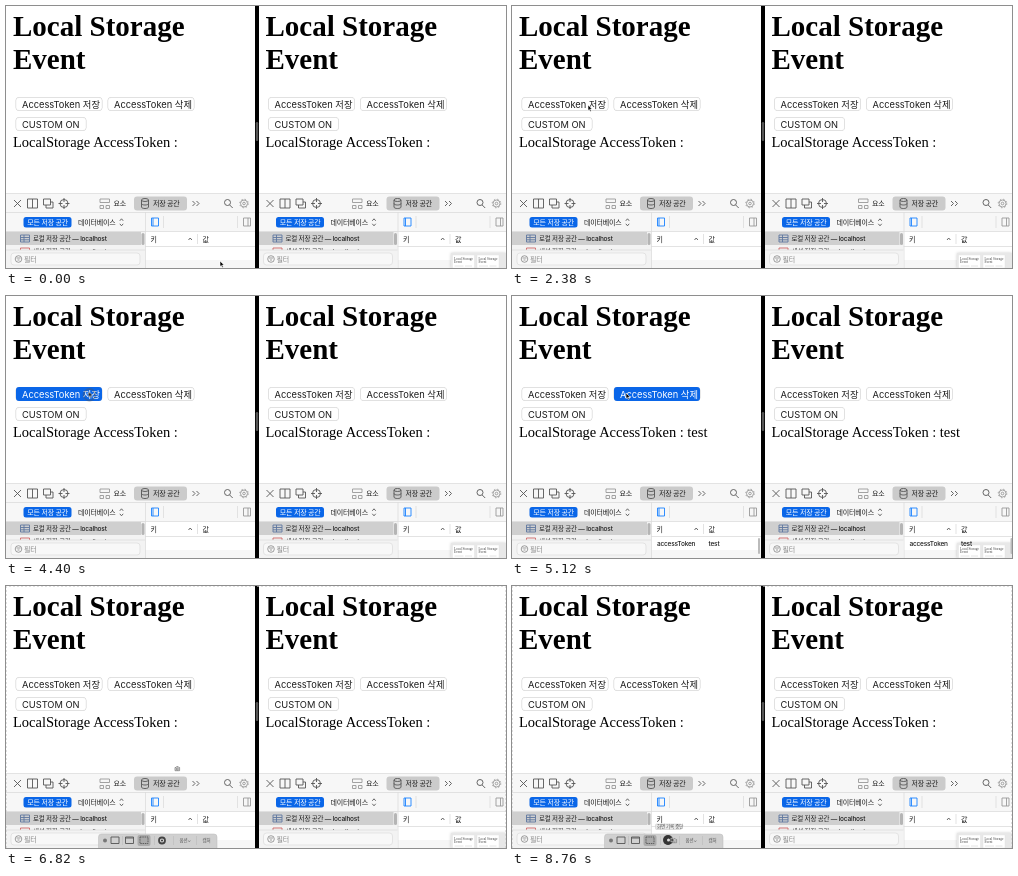
An HTML page that plays this animation: 500x262 px, repeating every 8.78 s.

```html
<!DOCTYPE html>
<html lang="ko">
<head>
<meta charset="utf-8">
<title>Local Storage Event</title>
<style>
html, body { margin: 0; width: 100%; height: 100%; overflow: hidden; background: #fff; }
svg { display: block; width: 500px; height: 262px; }
text { font-family: Inter, "Noto Sans CJK KR", "Noto Sans CJK", sans-serif; font-size: 7px; font-weight: 500; letter-spacing: -.03em; fill: #1c1c1c; }
.page { font: 14.5px "Liberation Serif", Times, serif; letter-spacing: 0; fill: #000; }
.h1 { font-size: 29px; font-weight: 700; }
.btn { font-size: 9.3px; font-weight: 400; letter-spacing: 0; }
.small { font-size: 6.5px; }
.tiny { font-size: 3.4px; fill: #444; }
.mini { font-size: 4.5px; fill: #555; }
.white { fill: #fff; }
.line { fill: none; stroke: #555; stroke-width: .9; }
.pale { stroke: #999; }
.rule { fill: none; stroke: #dcdcdc; stroke-width: .8; }
.box { fill: #fff; stroke: #e2e2e2; stroke-width: .5; filter: drop-shadow(0 .6px .7px #0005); }
.blue { fill: #0a66e8; }

.anim { animation: 8.78s step-end infinite; }
.hidden { opacity: 0; }
.custom { animation-name: custom; }
.save { animation-name: save; }
.del { animation-name: del; }
.stored { animation-name: stored; }
.ring { animation-name: ring; }
.arrow { animation-name: before; }
.camera, .capture { animation-name: after; }
.record { animation-name: record; }
.cursor { animation: move 8.78s ease-in-out infinite; }

@keyframes custom { 0%, 20.5% { opacity: 0 } 18.9% { opacity: 1 } }
@keyframes save { 0%, 31.66%, 51.02% { opacity: 0 } 30.29%, 49.65% { opacity: 1 } }
@keyframes del { 0%, 39.86%, 58.77% { opacity: 0 } 38.72%, 57.17% { opacity: 1 } }
@keyframes stored { 0%, 39.86%, 58.77% { opacity: 0 } 31.66%, 51.02% { opacity: 1 } }
@keyframes ring {
  0%, 20.3%, 31.5%, 39.8%, 50.9%, 58.1% { opacity: 0 }
  18.67%, 30.29%, 38.6%, 49.65%, 56.94% { opacity: 1 }
}
@keyframes before { 0% { opacity: 1 } 76.1% { opacity: 0 } }
@keyframes after { 0% { opacity: 0 } 76.1% { opacity: 1 } }
@keyframes record { 0% { opacity: 0 } 96.1% { opacity: 1 } }
@keyframes move {
  0%, .2% { transform: translate(214px, 255px) }
  2.28%, 4.78% { transform: translate(127px, 252px) }
  10.7%, 13.2% { transform: translate(64px, 117px) }
  14.1%, 23.9% { transform: translate(64px, 116px) }
  27.1%, 33.7% { transform: translate(76px, 99px) }
  36.2%, 40.5% { transform: translate(116px, 97px) }
  47.6%, 51% { transform: translate(82.5px, 95.5px) }
  53.5% { transform: translate(115px, 97px) }
  54.4%, 61.3% { transform: translate(114px, 97px) }
  68.8%, 77.9% { transform: translate(169px, 181px) }
  85.9% { transform: translate(198px, 250px) }
  95.9%, 100% { transform: translate(160px, 253px) }
}
</style>
</head>
<body>
<svg viewBox="0 0 500 262">
  <defs>
    <g id="pane">
      <text class="page h1" x="7" y="29.800">Local Storage</text>
      <text class="page h1" x="7" y="62.800">Event</text>
      <text class="page" x="7" y="141">LocalStorage AccessToken :</text>
      <rect class="box" x="10" y="91.500" width="86" height="13" rx="3"/>
      <rect class="box" x="102" y="91.500" width="86" height="13" rx="3"/>
      <rect class="box" x="10" y="111.500" width="70" height="13" rx="3"/>
      <text class="btn" x="16" y="101.500">AccessToken 저장</text>
      <text class="btn" x="108" y="101.500">AccessToken 삭제</text>
      <text class="btn" x="16" y="121.500">CUSTOM ON</text>

      <path fill="#f7f7f7" d="M0 188h249v37H0z"/>
      <path fill="#f3f3f3" d="M0 225h139v37H0z"/>
      <path fill="#f6f6f6" d="M139 254h110v8H139z"/>
      <path class="rule" d="M0 187.500h249M0 206.500h249M0 225.500h249M139.500 206v56M139 240.500h110M157.500 210v12M231.500 210v12M191.500 228v10"/>

      <rect x="128" y="190.500" width="53" height="14" rx="3" fill="#cbcbcb"/>
      <g class="line">
        <path d="M8 194l7 7m0-7l-7 7M21.500 193h10v9h-10zM26.500 193v9M37.500 193h7v6h-7zM40 199v3h7v-6h-2.500"/>
        <circle cx="58" cy="197.500" r="4"/>
        <path d="M58 192v4m0 3v4M52.500 197.500h4m3 0h4"/>
        <path class="pale" d="M94 193h9.500v3.500H94zM94 199.500h3.500v3H94zM100 199.500h3.500v3H100z"/>
        <ellipse cx="139" cy="194" rx="3.500" ry="1.500"/>
        <path d="M135.500 194v7c0 2 7 2 7 0v-7m-7 3.500c0 2 7 2 7 0"/>
        <path d="M186.500 195l2.500 2.500-2.500 2.500m4-5l2.500 2.500-2.500 2.500"/>
        <circle cx="221.500" cy="196.500" r="3"/>
        <path d="M223.700 199l3 3"/>
        <g class="pale">
          <circle cx="238" cy="197.500" r="3.500"/>
          <circle cx="238" cy="197.500" r="1.300"/>
          <circle cx="238" cy="197.500" r="4.300" stroke-dasharray="1.400 2"/>
          <path d="M237.500 212h7v8h-7zM242 212v8"/>
        </g>
        <path d="M113.800 214.800l1.700-2 1.700 2m-3.400 3l1.700 2 1.700-2M182.500 234l1.700-2 1.700 2"/>
      </g>
      <text x="107.500" y="200">요소</text>
      <text x="147" y="200">저장 공간</text>

      <rect class="blue" x="17.500" y="211" width="48" height="10.500" rx="2.500"/>
      <text class="white" x="21.300" y="218.700">모든 저장 공간</text>
      <text x="72" y="218.700">데이터베이스</text>
      <path class="line" d="M145.500 212h7v8h-7zM147 212v8" style="stroke:#1a82ff"/>

      <path fill="#cfcfcf" d="M0 226h135v13H0z"/>
      <rect x="135.500" y="227" width="3" height="12" rx="1.500" fill="#b5b5b5"/>
      <path class="line" d="M14.500 229h9v7h-9zM14.500 231.500h9m-9 2.300h9M18 229v7" style="stroke:#5f78a0"/>
      <text class="small" x="27" y="235">로컬 저장 공간 — localhost</text>
      <path class="line" d="M14.500 242h9v4h-9z" style="stroke:#c66"/>
      <text class="small" x="27" y="247.500">세션 저장 공간 — localhost</text>
      <path fill="#f3f3f3" d="M0 244h139v18H0z"/>
      <path class="rule" d="M0 244h139"/>
      <rect x="5" y="247" width="129" height="12" rx="3" fill="#f8f8f8" stroke="#dcdcdc" stroke-width=".7"/>
      <g class="line" style="stroke:#777;stroke-width:.7">
        <circle cx="12.500" cy="253" r="3.300"/>
        <path d="M10.500 252h4m-3 2h2"/>
      </g>
      <text x="18" y="255.700" style="fill:#888">필터</text>
      <text x="144.500" y="235.500">키</text>
      <text x="196.500" y="235.500">값</text>
    </g>

    <g id="data">
      <text class="page" x="175.300" y="141">test</text>
      <text class="small" x="145" y="249.500">accessToken</text>
      <text class="small" x="196.500" y="249.500">test</text>
      <rect x="246" y="242" width="2" height="16" rx="1" fill="#bbb"/>
    </g>

    <g id="card">
      <path fill="#fff" stroke="#ddd" stroke-width=".4" d="M0 0h22v13H0z"/>
      <text class="page tiny" x="1.500" y="4.800">Local Storage</text>
      <text class="page tiny" x="1.500" y="8.300">Event</text>
      <path stroke="#ddd" stroke-width=".8" d="M2 11h9m1.500 0h7"/>
    </g>
  </defs>

  <use href="#pane"/>
  <use href="#pane" x="252.500"/>
  <path fill="#e8e8e8" d="M445 247h55v15h-55z" style="filter:drop-shadow(0 0 1.500px #0003)"/>
  <use href="#card" x="446.500" y="249"/>
  <use href="#card" x="471" y="249"/>
  <g class="anim stored hidden">
    <use href="#data"/>
    <use href="#data" x="252.500"/>
  </g>
  <path d="M249 0h4v262h-4z"/>
  <rect x="249.800" y="116" width="2.400" height="19" rx="1.200" fill="#555"/>

  <g class="anim save hidden">
    <rect class="blue" x="10" y="91" width="86" height="14" rx="3"/>
    <text class="btn white" x="16" y="101.500">AccessToken 저장</text>
  </g>
  <g class="anim del hidden">
    <rect class="blue" x="102" y="91" width="86" height="14" rx="3"/>
    <text class="btn white" x="108" y="101.500">AccessToken 삭제</text>
  </g>
  <g class="anim custom hidden">
    <rect class="blue" x="10" y="111" width="70" height="14" rx="3"/>
    <text class="btn white" x="16" y="121.500">CUSTOM ON</text>
  </g>

  <g class="anim capture hidden">
    <path fill="none" stroke="#ccc" stroke-width=".6" stroke-dasharray="2 2" d="M.5 262V.5h499V262"/>
    <rect x="92.500" y="248" width="118.500" height="18" rx="3" fill="#d0d0d0" stroke="#bbb" stroke-width=".5"/>
    <rect x="131.500" y="249" width="13" height="11" rx="2" fill="#aaa"/>
    <circle cx="99" cy="254.500" r="2" fill="#777"/>
    <path class="line" d="M105 251h8v6.500h-8zM119.500 251h8v6.500h-8zM119.500 252h8"/>
    <path class="line" d="M134 251h8v6.500h-8z" stroke-dasharray="1.500 .8"/>
    <circle cx="156" cy="254.500" r="3" fill="#ddd" stroke="#444" stroke-width="1.800"/>
    <circle cx="156" cy="254.500" r="1.100" fill="#444"/>
    <path stroke="#bbb" stroke-width=".6" d="M116.500 250v9M148.500 250v9M167.500 250v9M190.500 250v9"/>
    <text class="mini" x="173.500" y="256">옵션⌄</text>
    <text class="mini" x="196.500" y="256">캡처</text>
  </g>

  <g class="cursor">
    <circle class="anim ring hidden" cx="1" cy="3.300" r="5.800" fill="none" stroke="#555" stroke-width=".8"/>
    <path class="anim arrow" stroke="#fff" stroke-width=".6" d="M0 0v5.600l1.300-1.200 1 2 1-.5-.9-1.900h1.700z"/>
    <g class="anim camera hidden" fill="#ddd" stroke="#777" stroke-width=".7">
      <path d="M0 .5h1l.6-.9h1.600l.6.900h.8v3.200H0z"/>
      <circle cx="2.300" cy="2" r="1"/>
    </g>
  </g>

  <g class="anim record hidden">
    <rect x="143.500" y="238" width="26" height="5.500" rx="1" fill="#e8e8e8" stroke="#bbb" stroke-width=".4"/>
    <text class="mini" x="145" y="242.300">화면 기록 중단</text>
    <circle cx="156" cy="254" r="5" fill="#333"/>
    <circle cx="156.500" cy="254" r="1.500" fill="#ddd"/>
    <path fill="#333" stroke="#fff" stroke-width=".5" d="M159 252l4 2-4 2z"/>
  </g>
</svg>
</body>
</html>
```
